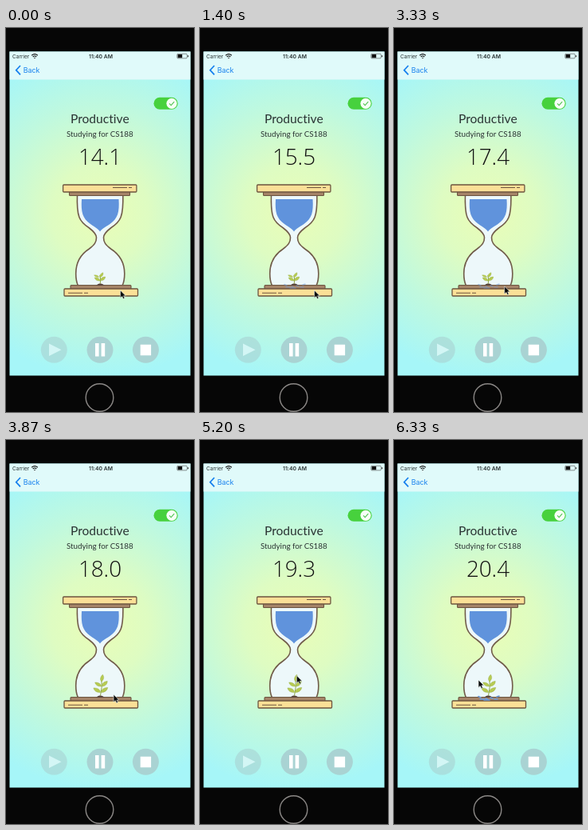
Recreate the animation shown at these times as an HTML page. Size 236x480 px, loop 6390 ms.

```html
<!DOCTYPE html>
<html lang="en">
<head>
<meta charset="utf-8">
<title>Hourglass timer</title>
<style>
  html, body { margin: 0; height: 100%; overflow: hidden; background: #060606; }
  svg { display: block; width: 100vw; height: 100vh; }
  text { font-family: Lato, sans-serif; fill: #2a3333; font-variant-ligatures: none; }
  .mid { text-anchor: middle; }
  .ui { font-family: Inter, sans-serif; }
  .wood { fill: #fbe097; stroke: #6c543f; stroke-width: 1.3; }
  .plate { fill: #a58468; stroke: #6c543f; stroke-width: 1.1; }
  .grain { stroke: #6c543f; stroke-width: 1.1; }
  .stem { fill: none; stroke: #8fa544; stroke-width: 1; }
</style>
</head>
<body>
<svg viewBox="0 0 236 480">
  <defs>
    <radialGradient id="glow" gradientUnits="userSpaceOnUse" cx="118" cy="232" r="205">
      <stop offset="0" stop-color="#eafdb6"/>
      <stop offset=".3" stop-color="#defcc2"/>
      <stop offset=".65" stop-color="#c0f9de"/>
      <stop offset="1" stop-color="#a6f6f8"/>
    </radialGradient>
    <path id="leaf" d="M0 0C1-3.4 5-4.2 9-2.6C7 .8 4 1.6 0 0Z" fill="#b7cb52" stroke="#93aa45" stroke-width=".4"/>
  </defs>

  <!-- phone -->
  <rect width="236" height="480" fill="#060606"/>
  <rect x="4.5" y="29.5" width="227" height="405" fill="url(#glow)"/>
  <rect x="4.5" y="29.5" width="227" height="35" fill="#e0fafa"/>
  <circle cx="117.5" cy="462" r="17.3" fill="none" stroke="#8a8785" stroke-width="1.4"/>

  <!-- status and navigation bars -->
  <text class="ui" x="8" y="37.5" font-size="6.5">Carrier</text>
  <g fill="none" stroke="#111" stroke-width="1.2">
    <path d="M32.2 34.2Q36 31 39.8 34.2M33.7 36Q36 34 38.3 36"/>
    <path d="M35.3 37.5h1.4"/>
  </g>
  <text class="ui mid" x="119" y="37.7" font-size="6.8" font-weight="600">11:40 AM</text>
  <rect x="214.8" y="32.3" width="12.4" height="5.6" rx="1" fill="none" stroke="#444" stroke-width=".6"/>
  <path d="M215.6 33h5.6v4.2h-5.6zM228 34.2h.9v2h-.9z" fill="#111"/>
  <path d="M18 47L12.7 52.7L18 58.4" fill="none" stroke="#1680ee" stroke-width="1.7"/>
  <text class="ui" x="21.7" y="56" font-size="8.9" style="fill:#1680ee">Back</text>

  <!-- switch -->
  <rect x="185.5" y="86.8" width="30.2" height="15" rx="7.5" fill="#47d13d"/>
  <circle cx="208" cy="94.3" r="6.6" fill="#f7fff7"/>
  <path d="M205 94.4l2.2 2.2l4-4.4" fill="none" stroke="#55c455" stroke-width="1.1"/>

  <text class="mid" x="117.8" y="119" font-size="15.6">Productive</text>
  <text class="mid" x="117.8" y="136" font-size="9.8">Studying for CS188</text>
  <text class="mid" id="count" x="118" y="171.3" font-size="27.8" font-weight="300"
        style="font-family:'Open Sans',sans-serif;fill:#111"></text>

  <!-- hourglass -->
  <path d="M89.5 208C88.5 236 92 242 104.5 250C111 255 113.5 258 113.5 262C113.5 268 111 271 104.5 276C92 284 87.7 294 87.7 307C87.7 314 88.5 318 90.5 322H146C148 318 148.8 314 148.8 307C148.8 294 144 284 131.5 276C125 271 122.5 268 122.5 262C122.5 258 125 255 131.5 250C144 242 147.5 236 146.8 208Z"
        fill="#edf8fa" stroke="#705b49" stroke-width="1.6"/>
  <path d="M95 214H141.5C142.5 230 140.5 238 130.5 245C123 250 120.5 251 118 254.5C115.5 251 113 250 106 245C96 238 94 230 95 214Z" fill="#6093dc"/>
  <rect class="plate" x="79.5" y="204.5" width="76" height="5" rx="1"/>
  <rect class="wood" x="71.6" y="196" width="92.3" height="9" rx="1"/>
  <path class="grain" d="M134 199.5h18m2 0h4"/>
  <rect class="plate" x="81" y="321.5" width="76" height="5" rx="1"/>
  <rect class="wood" x="73" y="326" width="92.5" height="9" rx="1"/>
  <path class="grain" d="M78 331.2h18m2 0h5"/>

  <!-- plant -->
  <path d="M113 322Q118 316.5 124 322Z" fill="#59443b"/>
  <g id="small">
    <path class="stem" d="M118.3 319.5Q119 314 118 309"/>
    <use href="#leaf" transform="translate(118 316) rotate(15) scale(-.85 .8)"/>
    <use href="#leaf" transform="translate(118.5 316) rotate(-22) scale(.85)"/>
    <use href="#leaf" transform="translate(118 311.5) rotate(-40) scale(.75)"/>
    <use href="#leaf" transform="translate(116.5 311.5) rotate(10) scale(-.7 .6)"/>
  </g>
  <g id="large">
    <path class="stem" d="M118.5 319.5Q121 310 120 298"/>
    <use href="#leaf" transform="translate(118.5 315.5) rotate(18) scale(-1.1 1)"/>
    <use href="#leaf" transform="translate(119.5 315.5) rotate(-22) scale(1.1 1)"/>
    <use href="#leaf" transform="translate(119.5 308) rotate(18) scale(-1 .9)"/>
    <use href="#leaf" transform="translate(120.5 308) rotate(-28)"/>
    <use href="#leaf" transform="translate(120 302) rotate(-65) scale(.95)"/>
  </g>
  <path id="water" d="M106 320.5l3 1.5m-1 2h5m2-1l4 2m2-3l3 1m2 1h4m-1-3l3-1m-19 5h7" fill="none" stroke="#6a9bdd" stroke-width="1.6" stroke-linecap="round"/>

  <!-- controls -->
  <g fill="#a9d3d3">
    <circle cx="60.3" cy="402.3" r="16.5" opacity=".6"/>
    <circle cx="118" cy="402.3" r="16.5"/>
    <circle cx="175.4" cy="402.3" r="16.5"/>
  </g>
  <path d="M54 394.5L69.5 402.3L54 410Z" fill="#d3f6f5"/>
  <path d="M112 394h4.6v16.5h-4.6zM119.6 394h4.6v16.5h-4.6zM168.7 395.8h13.4v13.4h-13.4z" fill="#fff"/>

  <path id="cursor" d="M0 0V9.4L2.2 7.4L3.7 10.6L5.4 9.8L4 6.8H6.8Z" fill="#080808" stroke="#e8f4f0" stroke-width=".6"/>
</svg>
<script>
  const LOOP = 6390, STEP = 200 / 3;
  const $ = id => document.getElementById(id);
  const show = (id, opacity) => $(id).setAttribute('opacity', opacity);

  // time, x, y of the pointer tip
  const path = [[0, 143.5, 328], [3070, 143.5, 328], [3330, 138.7, 323],
                [4400, 131.5, 313.5], [5200, 121.3, 294.5], [6330, 106, 300], [LOOP, 106, 300]];

  function pointer(t) {
    const i = path.findIndex(p => p[0] > t);
    const [a, b] = [path[i - 1], path[i]];
    const k = (t - a[0]) / (b[0] - a[0]);
    return [1, 2].map(n => a[n] + (b[n] - a[n]) * k);
  }

  function draw(now) {
    const tick = Math.floor((now % LOOP + 3.4) / STEP);
    const t = Math.min(10 * Math.round(tick * STEP / 10), LOOP - 1);
    const tenths = 142 + Math.floor((t - 24) / 100.2);
    $('count').textContent = (tenths / 10).toFixed(1);
    const grown = t >= 3730;
    show('small', grown ? 0 : 1);
    show('large', grown ? 1 : 0);
    show('water', t >= 5730 ? 1 : t >= 1330 && !grown ? 0.45 : 0);
    $('cursor').setAttribute('transform', `translate(${pointer(t)})`);
    requestAnimationFrame(() => draw(performance.now() - start));
  }
  const start = performance.now();
  draw(0);
</script>
</body>
</html>
```
